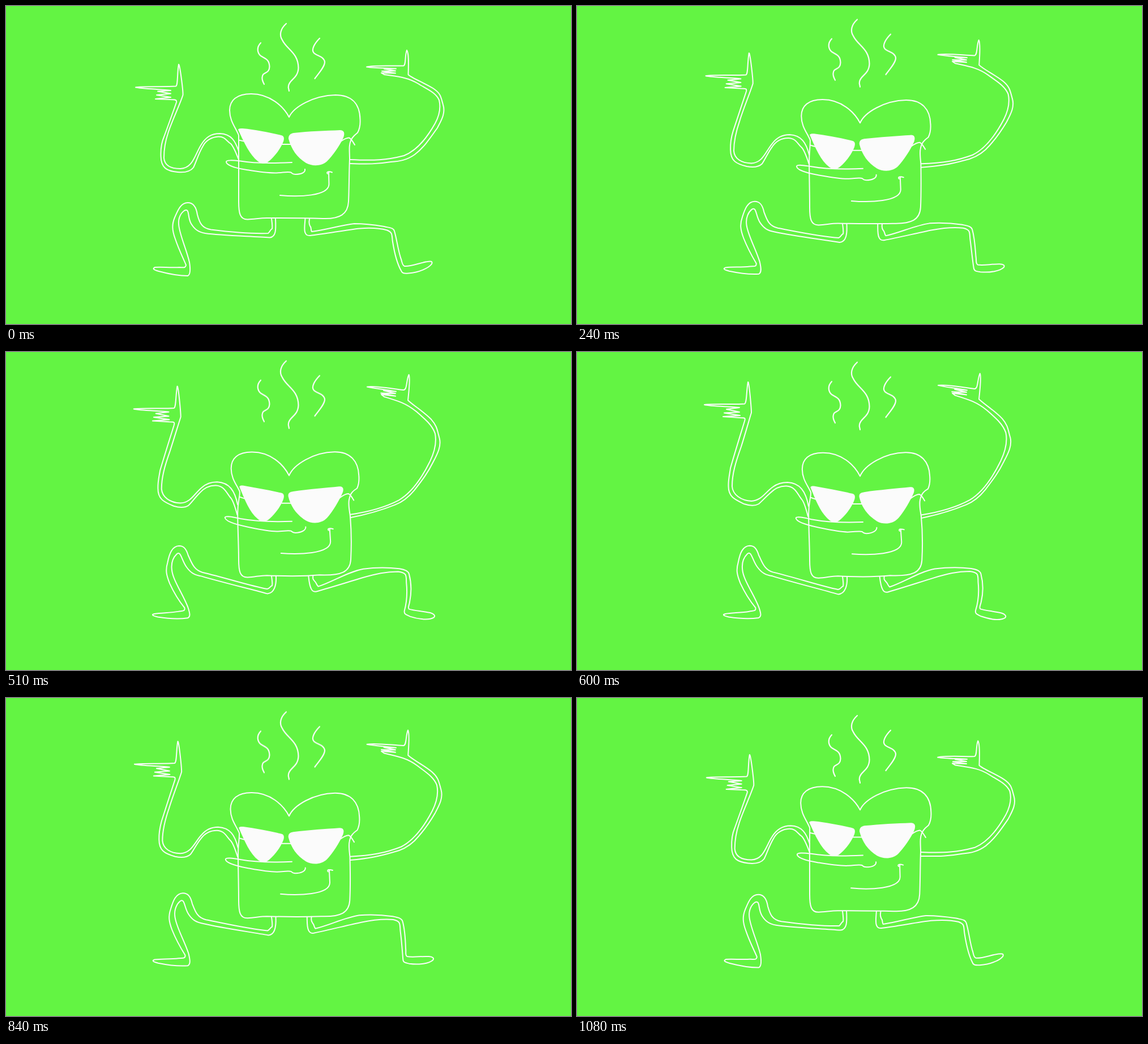
Write an HTML page without scripts that moves like this. It is 998x561 px and loops after 1.11 s.

```html
<!DOCTYPE html>
<html lang="en">
<head>
<meta charset="utf-8">
<title>Dancing toast</title>
<style>
html, body { margin: 0; width: 100%; height: 100%; overflow: hidden; background: #63f443; }
svg { display: block; width: 100%; height: 100%; }
path {
  fill: none; stroke: #fbfbfb; stroke-width: 2;
  stroke-linecap: round; stroke-linejoin: round;
}
/* each part bends from its d to its --b and back, one step every 30 ms */
.part { animation: bend 1110ms steps(19) infinite; }
.wave { animation: wave 1110ms steps(20) infinite; }
.lens { fill: #fbfbfb; stroke: none; }
.steam { animation: rise 1110ms steps(17) infinite; }
.steam path { stroke-width: 2.2; }
@keyframes bend { 51.35% { d: var(--b); animation-timing-function: steps(18); } }
@keyframes wave { 54.05% { d: var(--b); animation-timing-function: steps(17); } }
@keyframes rise {
  0%, 97.29%, 100% { transform: translateY(0); }
  45.94% { transform: translateY(-15.3px); animation-timing-function: steps(19); }
}
</style>
</head>
<body>
<svg viewBox="0 0 998 561">
  <g class="steam">
    <path d="M450,65 C442,73 444,83 450,88 C458,93 465,94 465.5,107 C465,121 453,115 452.5,126 C452,131 454,134 456,138"/>
    <path d="M495,31 C485,40 482,51 488,60 C496,77 516,82 516.5,109 C516,128 500,130 499,141 C498,145 500,147 500,150"/>
    <path d="M554,57 C546,65 538,77 544,83 C549,88 562,89 563,99 C563,107 553,118 545.5,128"/>
  </g>

  <!-- arms -->
  <path class="wave"
    d="M411,271 C406,258 402,248 397,243 C390,239 387,230 375,230.5 C364,231 353,237 348,247 C340,260 336,275 331,285 C325,293 314,294 303,293 C284,291 274,286 273.5,265 C273,250 275,240 279,231 C286,212 294,190 301,170 C302,166 300,165 290,165 L264,164 L291,161 L266,157 L291,154.5 L268,150.5 L291,149 C275,147 240,146 229,143.5 C240,141 280,143 300,141.5 C304,140 302,120 305,103 C307,102 313,150 312.5,157 C308,172 290,210 286,225 C281,240 279,255 279,268 C280,281 290,287 308,287 C330,286 333,264 344,246 C352,232 362,225 378,225 C398,226 405,238 411,256"
    style="--b:path('M408,290 C405,278 401,265 397,260 C390,252 386,237 370,236.5 C358,236 349,241 341,249 C333,256 328,262 321,268 C314,272 304,271 295,268 C278,260 267,255 267.5,236 C267,225 270,214 271,205 C278,180 288,148 296,122 C297,117 299,116 288,116 L258,114 L288,112 L260,107.5 L287,106 L264,101 L287,98 C272,96 236,96 225,93 C238,91 278,93 296,91.5 C300,90 299,70 302,53 C304,51 308,100 308,107 C304,120 297,145 290,167 C280,195 274,215 274,237 C275,252 290,262 308,263 C326,262 332,248 346,238 C354,232 364,230 372,230 C394,231 404,246 409,272')"/>
  <path class="part"
    d="M608,271 C650,273 672,272 703,264 C728,254 745,230 758,207 C766,192 768,178 765,166 C759,152 742,146 728,137 C710,126 695,125 668,121 L663,118 L688,118.5 L664,115 L688,114.5 L668,111 L689,110.5 C670,109.5 650,109.5 637,107.5 C650,104 680,106 702,105.5 C707,104 704,88 708,78 C712,84 711,105 710.5,121 C716,127 740,136 754,145 C768,154 768,160 772,174 C777,190 768,203 762,215 C750,232 738,250 722,262 C708,272 695,274 680,275 C655,279 640,279 608,278"
    style="--b:path('M608,288.5 C640,283 668,275 693,261 C718,246 735,218 748,191 C757,172 760,156 757,141 C752,126 740,115 724,101 C706,86 693,82 668,74 L663,70 L688,73 L662,67.5 L688,68.5 L667,63 L689,65 C670,61 650,59 638,56 C652,54 682,60 702,62.5 C709,63 707,46 712,35.5 C715,42 711,70 710,81 C722,92 738,102 751,116 C761,128 761,136 765,150 C768,163 762,176 754,191 C745,210 736,222 721,242 C710,256 700,264 688,269 C662,280 640,287 608,294')"/>

  <!-- legs -->
  <path class="part"
    d="M469,375 C470,383 471,389 470,393 C467,394 466,399 463,401 C430,402 390,398 362,394.5 C346,392 342,383 338,368 C336,354 331,347 321,347 C308,347 303,362 298,373 C293,385 293,395 299,411 C305,429 313,445 318,457 C317,463 313,461 306,461 C290,462 275,460 263,461 C259,463 259,465 270,468 C285,472 305,476 321,476 C326,474 326,465 324,452 C319,430 306,402 305,385 C304,374 309,365 315,361 C325,356 320,372 327,384 C333,394 340,399 352,401 C380,405 430,406 466,408.5 C477,407 477,395 476,375"
    style="--b:path('M469,397.5 C470,405 471,411 470,414.5 C467,415 466,419.5 461,420 C432,414 390,399 345,388 C329,383 326,369 320,358 C316,345 311,341.5 304,341.5 C292,342 287,354 284,371 C280,385 282,393 288,408 C296,425 306,440 315,450.5 C317,457 312,456 304,457.5 C290,460 275,460 262,462 C257,463 257,465 268,467.5 C285,470 305,471 321,468.5 C326,466 325,461 321,450 C312,427 293,402 291.5,384 C290,372 294,362 300,356 C307,349 309,367 318,379 C326,390 333,393 345,395 C380,406 430,419 461,428.5 C474,428 478,412 477,397.5')"/>
  <path class="part"
    d="M528.5,375 C528,384 526,395 528.5,400 C530,404 532,405 537,405 C565,402 600,395 625,392.5 C645,391 660,392 673,395.5 C684,400 681,404 683,416 C686,435 690,453 698,467 C700,472 703,472 711,471.5 C730,470 747,462 752,455 C754,450 750,450 744,451 C730,453 716,460 704,459 C699,457 700,451 697,444 C692,428 690,410 686,397 C684,391 678,391.5 668,389 C650,386 635,384 615,384 C590,387 565,395 540,398 C538,395 540,391 537,388 C534,382 536,380 536,375"
    style="--b:path('M535,397.5 C536,405 537,413 540,419 C542,424 545,426 550,424.5 C575,417 605,407 630,399 C655,391 672,387 695,386.5 C711,388 710,393 710,405 C712,425 710,440 704.5,455 C703,461 706,462 714,466 C730,472 747,475 756,470 C760,467 756,463 750,461 C736,457.5 722,456 713,453 C710,450 714,446 715,440 C719,425 720,410 715,391 C714,386 708,383 698,381.5 C680,379.5 655,379.5 633,382.5 C605,388 580,406 553,415.5 C549,412 550,410 546,406 C542,402 543,402 543,396.5')"/>

  <!-- bread -->
  <path class="part"
    d="M500,196 C490,177 466,155 433,155 C408,155 395,166 395,184 C395,203 406,215 411,228 C411,240 411,252 411,265 C411,290 411,320 411,345 C411,365 413,377 427,376.5 C440,376 448,374 461,374 C497,374 520,374 560,375 C590,376 604,367 605,345 C606,325 606,290 607,270 C607,262 606,250 607,246 C608,235 614,229 621,223.5 C624,218 626,208 625.5,200 C625,172 610,157 582,157 C543,158 508,178 500,196"
    style="--b:path('M500,220.5 C490,200.5 467,178.5 434,179 C410,179 398,190 398,208 C398,227 409,238 413,248.5 C414,256 409,264 409,286.5 C409,312 411,346 411,368.5 C411,389 413,400.5 427,400 C440,399.5 448,396.5 461,396.5 C490,398 520,399 553,395.5 C594,397 608,390 609.5,369 C611,340 610,310 608,291 C606,278 604,270 606,262 C608,250 614,246 620,242.5 C623,236 623.5,226 623,220 C622,195 608,178 580,178.5 C543,179 508,201 500,220.5')"/>

  <!-- sunglasses -->
  <path class="part lens"
    d="M410,218 C411,216 414,216 418,216 C440,218 465,223 486,228 C491,229 492,233 490,239 C485,252 474,266 464,274 C458,279 452,279 445,274 C430,262 421,242 410,218Z"
    style="--b:path('M412.5,240 C413,238 416,237.5 420,238 C442,242 465,246 486,251 C491,252 492,256 490,262 C486,274 475,289 464,298 C458,302.5 452,302.5 446,298 C431,286 423,266 412.5,240Z')"/>
  <path class="part lens"
    d="M499,234 C499,228 502,225 508,224 C535,221 565,220 590,219 C597,219 599,224 596,232 C590,246 577,264 567,274 C557,283 541,283 530,277 C514,267 504,253 499,234Z"
    style="--b:path('M498.5,257 C498,251 501,249.5 507,248.5 C535,244.5 565,242 588,239.5 C595,239 597,243 594.5,250 C589,263 577,284 567,295 C557,305.5 541,306 530,300 C514,290 503,276 498.5,257Z')"/>
  <path class="part"
    d="M411,236.5 L420,238.5 M488,244 L503,244 M591,239 C597,235 602,232 606,232.5 C610,234 613,240 616,245"
    style="--b:path('M413,258 L422,261 M487,269.5 L503,269.5 M589,259.5 C595,255 600,252 604.5,252 C608,253 611,258 614,263.5')"/>

  <!-- nose and mouth -->
  <path class="part"
    d="M505,276 C475,277.5 440,278 414,273.5 C400,272 389,271.5 389,275 C389,281 406,286 425,289 C440,291.5 460,295 478,294.5 C490,294 500,291.5 504,294 C506,296 506,297 511,297 C521,297 529,294 528,288"
    style="--b:path('M505,301.5 C475,302.5 440,301.5 414,296.5 C400,293 387,290.5 386.5,294 C387,300 404,306 425,310.5 C440,313.5 460,318.5 478,319 C490,319 500,316.5 504,318.5 C506,320.5 506,321.5 511,321.5 C521,321.5 530,317 529.5,311')"/>
  <path class="part"
    d="M484,334 C515,337 571,336 570.5,314 L570,293 M568,296 C565,292 571,291.5 576,293.5"
    style="--b:path('M486,357.5 C515,360 573.5,359 573.5,337 L572,315 M570,317 C567,313 573,313 578,314.5')"/>
</svg>
</body>
</html>
```
